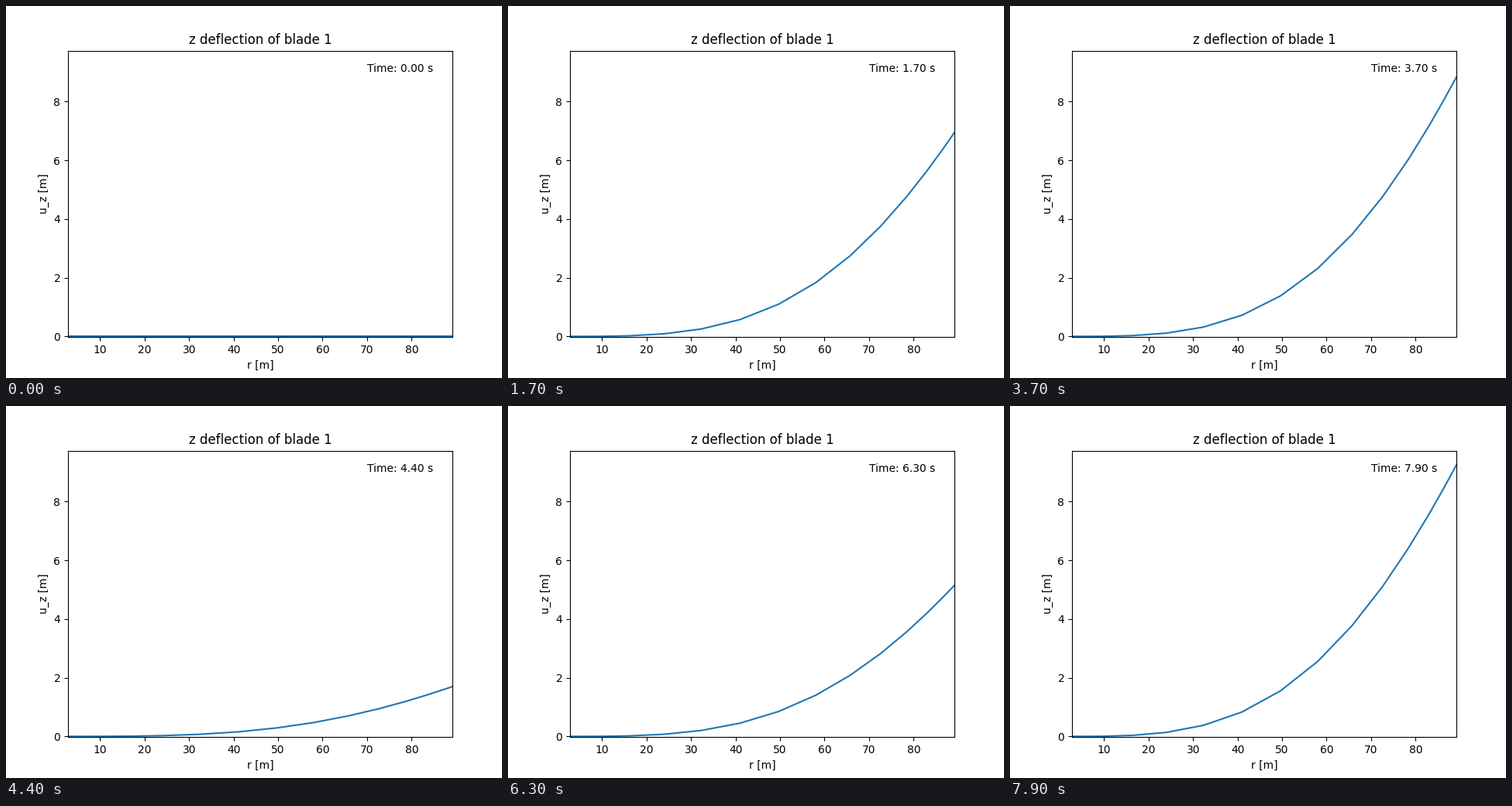
A matplotlib script that plays this animation: 640 by 480 pixels, repeating every 8 s.

```python
import numpy as np
import matplotlib.pyplot as plt
from matplotlib.animation import FuncAnimation

FRAMES, STEP = 80, 100
ROOT, TIP = 2.8, 89.166
LOW, HIGH = 1.15, 9.68

# Times at which the tip turns, lowest and highest in turn
TURNS = [0, 1.29, 2.36, 3.475, 4.58, 5.72, 6.835, 8.08]

# Blade stations, closer together near both ends
u = np.linspace(0, 1, 16) ** 0.84
x = (1 - np.cos(np.pi * u)) / 2
r = ROOT + (TIP - ROOT) * x


def wave(angle, shift):
    return np.cos(angle - np.radians(shift))


def deflection(t):
    swing = np.interp(t, TURNS, range(len(TURNS)))
    angle = np.pi * swing
    low = LOW * min(swing, 1)  # the blade starts undeflected
    tip = low + (HIGH - low) * (1 - np.cos(angle)) / 2
    # The second bending mode makes the curve fuller or flatter
    fullness = 0.64 + 0.4 * wave(angle, 245) + 0.45 * wave(2 * angle, 285)
    return tip * x ** (3.31 - 0.27 * fullness - 0.37 * x ** 2)


fig, ax = plt.subplots(figsize=(6.4, 4.8), dpi=100)
line, = ax.plot(r, 0 * r, color="#1f77b4", lw=1.5)
label = ax.text(70, 9, "")
ax.set(xlim=(ROOT, TIP), ylim=(-0.024, 9.734), xlabel="r [m]",
       ylabel="u_z [m]", title="z deflection of blade 1")


def update(i):
    t = i * STEP / 1000
    line.set_ydata(deflection(t))
    label.set_text(f"Time: {t:.2f} s")
    return line, label


anim = FuncAnimation(fig, update, frames=FRAMES, interval=STEP,
                     repeat=True, repeat_delay=0)
plt.show()
```
